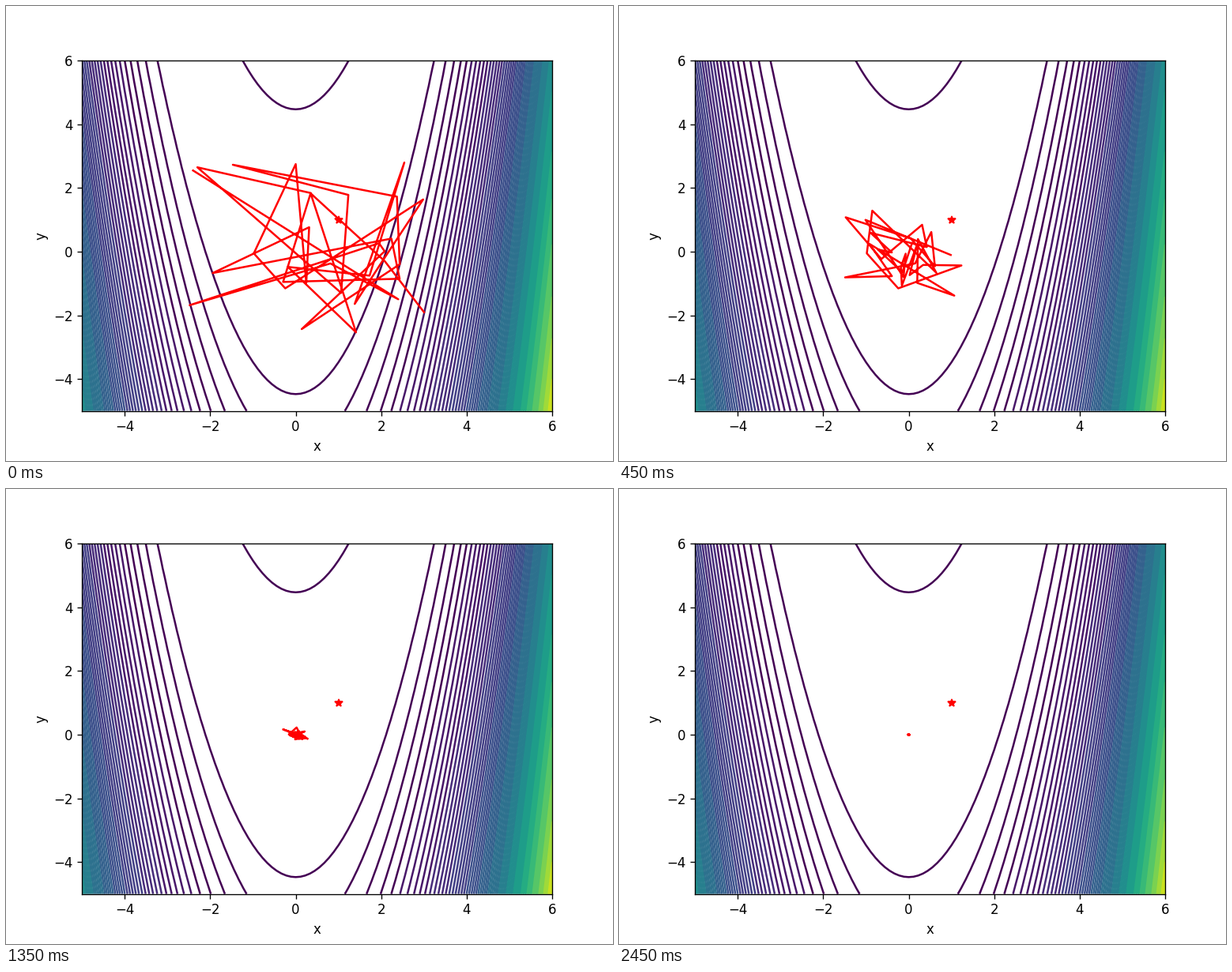
Write a matplotlib script that moves like this. It is 768x576 px and loops after 2500 ms.

```python
import numpy as np
import matplotlib.pyplot as plt
from matplotlib.animation import FuncAnimation
from matplotlib.colors import ListedColormap

FRAMES = 50
INTERVAL = 50
SIZE = 33

# Outermost individuals of the first population, in drawing order
CORNERS = [(-2.4, 2.55), (-2.48, -1.68), (0.14, -2.43), (-1.47, 2.73),
           (-2.3, 2.65), (2.43, -0.85), (-1.94, -0.67), (0, 2.75),
           (2.98, 1.64), (2.54, 2.8), (1.41, -2.53), (3, -1.9)]


def first_population(rng):
    pop = rng.uniform((-1.8, -1.8), (2.5, 2), (SIZE, 2))
    slots = np.linspace(0, SIZE - 1, len(CORNERS)).round().astype(int)
    pop[slots] = CORNERS
    return pop


def evolve(pop, k, rng):
    """Next generation: a shrinking cloud that tilts as it closes in."""
    reach = 3 * np.exp(-0.066 * k - 0.00073 * k * k)
    tilt = 0.5 * min(k / 14, 1)
    u, v = rng.uniform(-1, 1, (2, SIZE))
    trial = reach * np.column_stack([u, (0.8 - tilt) * v - tilt * u])
    outside = (np.abs(pop) > (reach, 0.9 * reach)).any(axis=1)
    better = np.hypot(*trial.T) < np.hypot(*pop.T)
    chosen = outside | (better & (rng.random(SIZE) < 0.25))
    return np.where(chosen[:, None], trial, pop)


rng = np.random.default_rng(4)
history = [first_population(rng)]
for k in range(1, FRAMES):
    history.append(evolve(history[-1], k, rng))

fig, ax = plt.subplots(figsize=(6.4, 4.8), dpi=120)
bands = ListedColormap(plt.get_cmap("viridis")(np.linspace(0, 0.92, 16)))
grid = np.linspace(-5, 6, 100)
X, Y = np.meshgrid(grid, grid)
ax.contour(X, Y, (1 - X) ** 2 + 100 * (Y - X ** 2) ** 2, 100, cmap=bands)
ax.plot(1, 1, "r*")
line, = ax.plot([], [], "r-")
ax.set(xlim=(-5, 6), ylim=(-5, 6), xlabel="x", ylabel="y")


def update(frame):
    line.set_data(*history[frame].T)
    return line,


anim = FuncAnimation(fig, update, frames=FRAMES, interval=INTERVAL,
                     repeat=True, repeat_delay=0)
plt.show()
```
